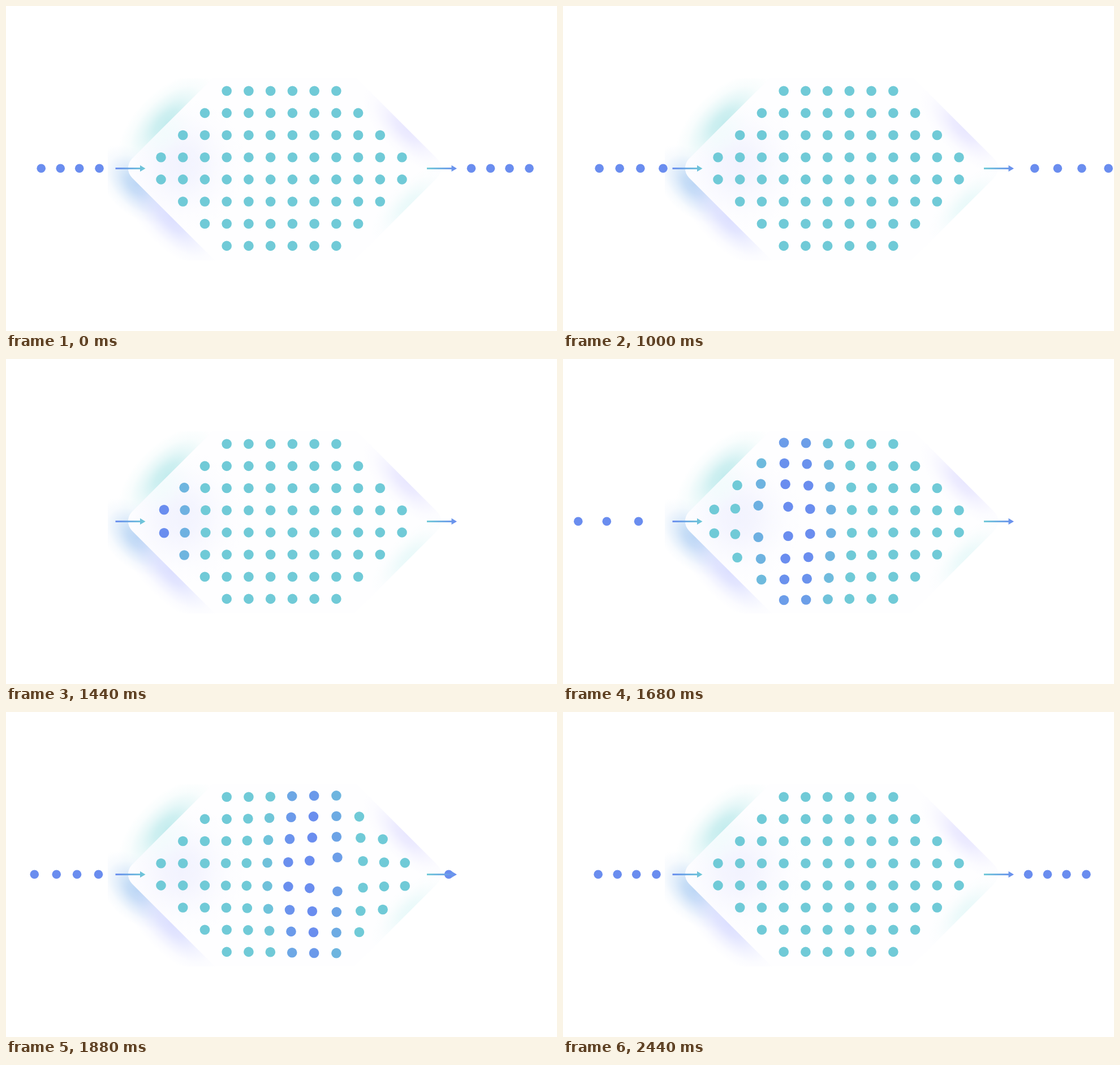
An HTML page with a canvas that plays this animation: 974x575 px, repeating every 2.48 s.

```html
<!DOCTYPE html>
<html lang="en">
<head>
<meta charset="utf-8">
<title>Dot wave</title>
<style>
  html, body { margin: 0; width: 100%; height: 100%; overflow: hidden; background: #fff; }
  canvas { display: block; width: 974px; height: 575px; }
</style>
</head>
<body>
<canvas id="stage" width="974" height="575"></canvas>
<script>
const W = 974, H = 575, LOOP = 2480, STEP = 40;
const MID = 287.3;
const TEAL = [112, 202, 215], BLUE = [106, 141, 239];
const ctx = document.getElementById('stage').getContext('2d');
const clamp = (v, lo = 0, hi = 1) => Math.min(hi, Math.max(lo, v));
const rgb = c => `rgb(${c.map(Math.round).join(',')})`;
const mix = (a, b, p) => a.map((v, i) => v + (b[i] - v) * p);

function dot(x, y, r, color) {
  ctx.fillStyle = rgb(color);
  ctx.beginPath();
  ctx.arc(x, y, r, 0, Math.PI * 2);
  ctx.fill();
}

// Backdrop: rounded diamond with soft tints on both sides of its edges
function diamond(g) {
  g.beginPath();
  g.moveTo(492.5, 0.5);
  g.arcTo(779, 287, 492.5, 573.5, 24);
  g.lineTo(492.5, 573.5);
  g.arcTo(206, 287, 492.5, 0.5, 24);
  g.closePath();
}

function glow(g, x, y, rx, ry, degrees, color, alpha) {
  const fill = g.createRadialGradient(0, 0, 0, 0, 0, 1);
  [1, 0.82, 0.42, 0.12, 0].forEach((a, i) =>
    fill.addColorStop(i / 4, `rgba(${color},${a * alpha})`));
  g.save();
  g.translate(x, y);
  g.rotate(degrees * Math.PI / 180);
  g.scale(rx, ry);
  g.fillStyle = fill;
  g.fillRect(-1, -1, 2, 2);
  g.restore();
}

function makeBackdrop() {
  const layer = document.createElement('canvas');
  layer.width = W;
  layer.height = H;
  const g = layer.getContext('2d');
  g.fillStyle = '#fff';
  g.fillRect(0, 0, W, H);
  g.save();
  g.beginPath();
  g.rect(180, 128, 600, 322);
  g.clip();
  glow(g, 285, 207, 110, 56, -45, '176,230,232', 0.75);
  glow(g, 232, 316, 85, 52, 45, '170,205,242', 0.8);
  glow(g, 292, 376, 115, 50, 45, '212,216,255', 0.8);
  diamond(g);
  g.clip();
  g.fillStyle = '#fefeff';
  g.fillRect(0, 0, W, H);
  glow(g, 310, 280, 115, 120, 0, '238,239,254', 0.75);
  glow(g, 280, 225, 70, 45, -45, '240,252,252', 0.7);
  glow(g, 708, 217, 100, 44, 45, '226,224,255', 0.75);
  glow(g, 714, 353, 90, 40, -45, '224,247,247', 0.7);
  g.restore();
  return layer;
}
const backdrop = makeBackdrop();

function arrow(x, from, to) {
  const fill = ctx.createLinearGradient(x, 0, x + 53, 0);
  fill.addColorStop(0, rgb(from));
  fill.addColorStop(1, rgb(to));
  ctx.fillStyle = fill;
  ctx.fillRect(x, MID - 1.4, 45, 3);
  ctx.beginPath();
  ctx.moveTo(x + 43.5, MID - 5.6);
  ctx.lineTo(x + 53, MID + 0.1);
  ctx.lineTo(x + 43.5, MID + 5.8);
  ctx.fill();
}

// Queues of side dots, leading dot first: they speed away, then a new set settles
const queues = [
  { homes: [165, 129.7, 96.2, 62.2], leave: 674, ends: [2056, 2107, 2138, 2175], rate: 0.0063, power: 4 },
  { homes: [925, 890, 856.5, 822.5], leave: 561, ends: [2189, 2254, 2303, 2355], rate: 0.0169, power: 3 }
];

function drawQueues(t) {
  ctx.save();
  ctx.beginPath();
  ctx.rect(0, 0, 216, H);
  ctx.rect(769, 0, W - 769, H);
  ctx.clip();
  for (const q of queues) {
    q.homes.forEach((home, i) => {
      const shift = t < 1440
        ? (0.0057 * Math.max(0, t - q.leave - 39 * i)) ** 4
        : -((q.rate * Math.max(0, q.ends[i] - t)) ** q.power);
      dot(home + shift, MID, 7.8, BLUE);
    });
  }
  ctx.restore();
}

// Point that pushes the grid away as it travels along the middle line
const track = [[1160, -50], [1280, 40], [1440, 158], [1680, 366], [1880, 580], [2040, 747], [2240, 960], [LOOP, 1210]];

function pusherX(t) {
  if (t < track[0][0]) return -400;
  const i = track.findIndex(p => p[0] > t);
  const [t0, x0] = track[i - 1], [t1, x1] = track[i];
  return x0 + (x1 - x0) * (t - t0) / (t1 - t0);
}

function drawGrid(t) {
  const push = pusherX(t);
  const tintX = 409 + 0.645 * (t - 1680);
  for (let row = 0; row < 8; row++) {
    const inset = Math.max(0, 3 - Math.min(row, 7 - row));
    for (let col = inset; col < 12 - inset; col++) {
      const x = 274 + 38.73 * col, y = 150.2 + 39.17 * row;
      const dx = x - push, dy = y - MID;
      const force = 12 * clamp(1 - Math.hypot(dx, 1.3 * dy) / 220) / Math.hypot(dx, dy);
      const p = clamp((85 - Math.hypot(x - tintX, 0.3 * dy)) / 60);
      const tint = t > 1160 ? p * p * (3 - 2 * p) : 0;
      dot(x + dx * force, y + dy * force, 8.8, mix(TEAL, BLUE, tint));
    }
  }
}

function draw(now) {
  const t = Math.floor((now % LOOP) / STEP) * STEP;
  ctx.drawImage(backdrop, 0, 0);
  drawQueues(t);
  drawGrid(t);
  arrow(193.5, BLUE, TEAL);
  arrow(744, TEAL, BLUE);
}

const start = performance.now();
function frame() {
  draw(performance.now() - start);
  requestAnimationFrame(frame);
}
frame();
</script>
</body>
</html>
```
